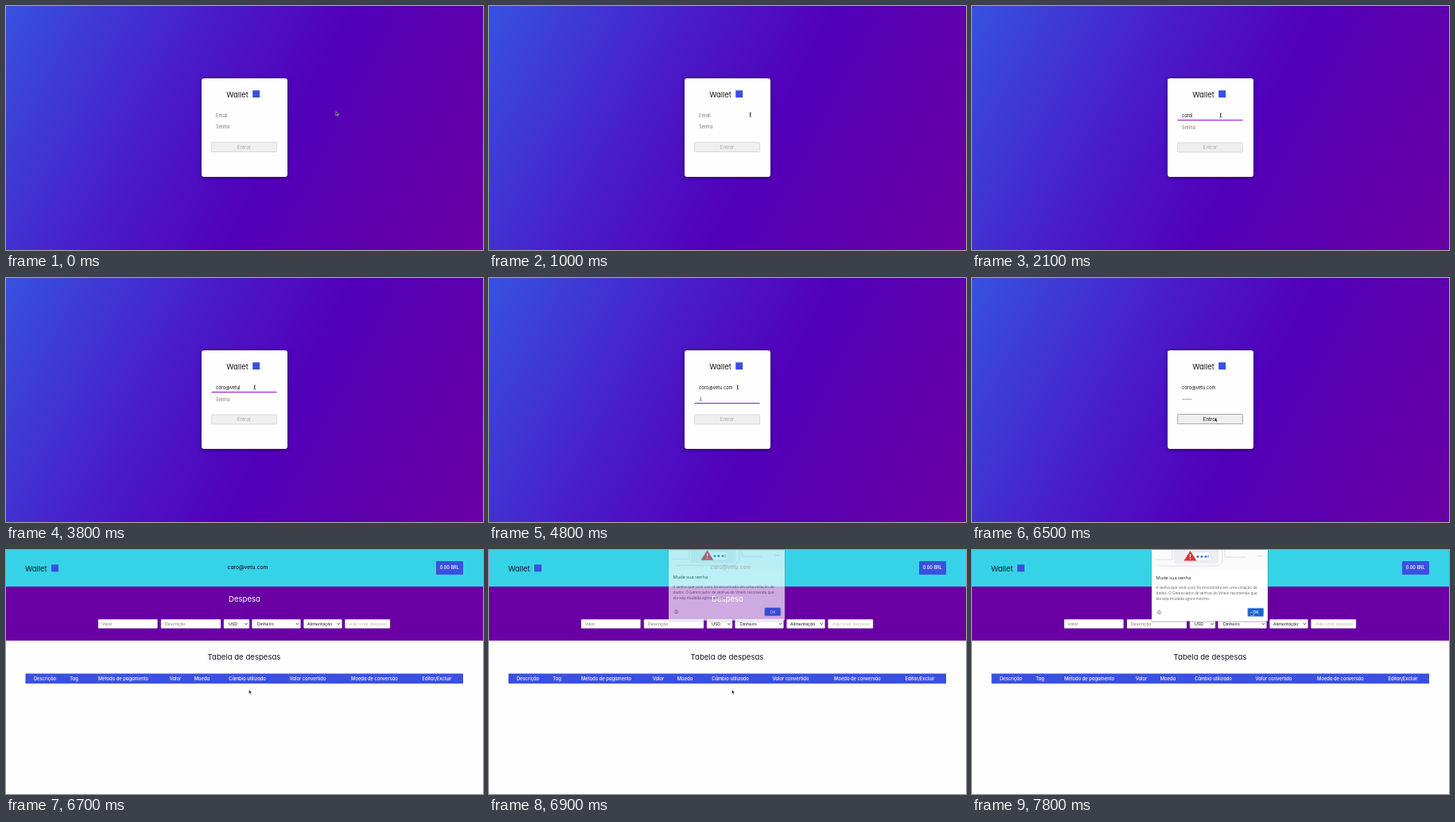
Animation of 600 by 307 pixels, one loop 8 s. Source, as an HTML page:

```html
<!DOCTYPE html>
<html lang="pt-BR">
<head>
<meta charset="utf-8">
<title>Wallet</title>
<style>
  html, body { margin: 0; height: 100%; overflow: hidden; }
  body { background: #fefefe; }
  svg { display: block; width: 100vw; height: 100vh; }
  text { font-family: Inter, Lato, sans-serif; font-feature-settings: "cv11"; white-space: pre; }
  .dots { font-family: "DejaVu Sans", sans-serif; }
  #popup text { font-family: "Open Sans", "Noto Sans", sans-serif; }
  .mid { text-anchor: middle; }
  .bg { width: 600px; height: 307px;
    background: linear-gradient(118deg, #3652df 0%, #4a1ac8 36%, #5200b9 58%, #6a00a3 100%); }
  .card { position: absolute; left: 246px; top: 91px; width: 107.5px; height: 123.5px;
    border-radius: 3px; background: #fefefe; box-shadow: 0 1px 5px #0008; }
</style>
</head>
<body>
<svg id="stage" viewBox="0 0 600 307"></svg>
<script>
const LOOP = 8000, STEP = 100;
const BLUE = '#3a50e0', PURPLE = '#6a00a3', INK = '#151520';
const EMAIL = 'caro@vetu.com';
const emailKeys = [1600, 1700, 1800, 2100, 2900, 3200, 3300, 3500, 3700, 4000, 4200, 4400, 4500];
const passKeys = [4800, 4900, 5100, 5300, 5500, 5700];

const text = (x, y, size, str, fill = INK, extra = '') =>
  `<text x="${x}" y="${y}" font-size="${size}" fill="${fill}" ${extra}>${str}</text>`;
const mid = (x, y, size, str, fill, weight = 400) =>
  text(x, y, size, str, fill, `class="mid" font-weight="${weight}"`);
const rect = (x, y, w, h, fill, extra = '') =>
  `<rect x="${x}" y="${y}" width="${w}" height="${h}" fill="${fill}" ${extra}/>`;
const brand = (x, y) => text(x, y, 9.4, 'Wallet') + rect(x + 33, y - 8.5, 9, 9, BLUE);

const login = `
  <foreignObject width="600" height="307"><div class="bg"></div></foreignObject>
  <foreignObject width="600" height="307"><div style="position:relative"><div class="card"></div></div></foreignObject>
  ${brand(277.2, 114.7)}
  ${text(264, 139.6, 5.7, '', INK, 'id="email"')}
  <g id="lower">
    ${text(264, 154, 5.7, '', INK, 'id="pass"')}
    ${rect(258.5, 171.5, 82, 12, '#efefef', 'id="enter" rx="1" stroke-width=".7"')}
    ${text(299.5, 179.6, 6.1, 'Entrar', INK, 'id="enterText" class="mid"')}
  </g>
  ${rect(258.5, 0, 82, 1.2, '#9a2bcf', 'id="underline"')}
  ${rect(0, 0, .5, 5.6, '#111', 'id="caret"')}`;

const fields = [
  // x, width, text x, label, colour, chevron x
  [116, 74.5, 120.5, 'Valor', '#777'],
  [195, 75, 200, 'Descrição', '#777'],
  [274, 32, 280, 'USD', INK, 302],
  [309.5, 61, 316, 'Dinheiro', INK, 366.5],
  [374.5, 48, 379, 'Alimentação', INK, 418.3],
  [426.5, 56.5, 432, 'Adicionar despesa', '#bbb']
].map(([x, w, tx, label, fill, chev]) =>
  rect(x, 87.3, w, 11.2, '#fff', 'rx="1" stroke="#bbb" stroke-width=".4"') + text(tx, 94.8, 5.3, label, fill) +
  (chev ? `<path d="M${chev - 1.5} 92.2l1.5 1.6 1.5-1.6" fill="none" stroke="#111" stroke-width=".8"/>` : '')).join('');

const columns = [[49, 'Descrição'], [85.5, 'Tag'], [147.5, 'Método de pagamento'], [213, 'Valor'],
  [246.5, 'Moeda'], [303.5, 'Câmbio utilizado'], [379.5, 'Valor convertido'],
  [463.5, 'Moeda de conversão'], [542, 'Editar/Excluir']
].map(([x, label]) => mid(x, 163.6, 5.8, label, '#fff', 500)).join('');

const home = `
  ${rect(0, 0, 600, 307, '#fefefe')}
  ${rect(0, 0, 600, 46, '#36d3e8')}
  ${brand(24, 26.8)}
  ${mid(304, 24.4, 6.7, EMAIL, INK, 500)}
  ${rect(541, 14, 34, 17, BLUE, 'rx="1"')}
  ${mid(557.8, 24.3, 5.6, '0.00 BRL', '#fff', 500)}
  ${rect(0, 46, 600, 68, PURPLE)}
  ${mid(300, 64.8, 9.6, 'Despesa', '#fff')}
  ${fields}
  ${mid(299.5, 137.7, 9.6, 'Tabela de despesas')}
  ${rect(24.5, 155.5, 550.5, 12.5, BLUE)}
  ${columns}`;

const popup = `
  ${rect(225.5, -4, 147.5, 95, '#0003', 'rx="1.5"')}
  ${rect(226, -4, 146, 93.5, '#fff', 'rx="1"')}
  ${rect(226, 0, 146, 24, '#fafafb')}
  <path d="M230 12h22V0M235 20h74l6-5V0M318 0v9h26" fill="none" stroke="#dfe1e5" stroke-width="1"/>
  ${rect(254, 0, 56, 17, '#eceef1', 'rx="2"')}
  ${rect(278, 3, 22, 10.5, '#fff', 'rx="2" stroke="#d5dae2" stroke-width=".6"')}
  ${[284, 289, 294].map(x => `<circle cx="${x}" cy="8.2" r="1.5" fill="#3478e0"/>`).join('')}
  ${rect(296.7, 6.2, .8, 4, '#3478e0')}
  <path d="M274.5 1l8 12.5h-16z" fill="#d9343a"/>
  ${rect(274, 5, 1.1, 4.2, '#fff')}${rect(274, 10.4, 1.1, 1.2, '#fff')}
  ${[360.5, 362.5, 364.5].map(x => `<circle cx="${x}" cy="7.3" r=".6" fill="#bbb"/>`).join('')}
  ${text(231.5, 36.8, 5.7, 'Mude sua senha', '#202124', 'font-weight="500"')}
  ${['A senha que você usou foi encontrada em uma violação de',
     'dados. O Gerenciador de senhas do Vinelo recomenda que',
     'ela seja mudada agora mesmo.'].map((s, i) => text(231.5, 48.8 + i * 7.1, 4.65, s, '#5f6368')).join('')}
  <circle cx="235.6" cy="78.5" r="2.1" fill="none" stroke="#5f6368" stroke-width=".6"/>
  ${rect(235.3, 77.2, .6, .6, '#5f6368')}${rect(235.3, 78.2, .6, 1.6, '#5f6368')}
  ${rect(346.3, 72.8, 21, 11.2, '#8db8f3', 'rx="1.5"')}
  ${rect(347.2, 73.6, 19.2, 9.6, '#1a73e8', 'id="ok" rx="1"')}
  ${mid(356.8, 80.3, 5, 'OK', '#fff', 600)}`;

const stage = document.getElementById('stage');
stage.innerHTML = `<g id="login">${login}</g><g id="home">${home}</g><g id="popup">${popup}</g>
  <path id="arrow" d="M0 0V5.2L1.2 4.1 2 5.9 2.9 5.5 2.1 3.8H3.7Z" fill="#111" stroke="#fff" stroke-width=".5"/>
  <path id="beam" d="M-1.2-2.6Q0-2.6 0-1.8V1.8Q0 2.6-1.2 2.6M1.2-2.6Q0-2.6 0-1.8V1.8Q0 2.6 1.2 2.6"
    fill="none" stroke="#222" stroke-width=".7"/>`;

const el = {};
stage.querySelectorAll('[id]').forEach(n => el[n.id] = n);
const set = (id, attrs) => Object.entries(attrs).forEach(([k, v]) => el[id].setAttribute(k, v));
const show = (id, on) => el[id].style.display = on ? '' : 'none';
const count = (keys, t) => keys.filter(k => k <= t).length;

// start, end, from, to
const moves = [
  [400, 1200, [415, 132.5], [312.7, 137.5]],
  [5900, 6500, [312.7, 137.5], [305.5, 175.8]],
  [7100, 7800, [305.5, 175.8], [351, 78]]
];
function pointer(t) {
  const [a, b, from, to] = moves.findLast(m => t >= m[0]) || moves[0];
  const p = Math.min(1, Math.max(0, (t - a) / (b - a)));
  const e = p * p * (3 - 2 * p);
  return from.map((v, i) => v + (to[i] - v) * e);
}

function drawLogin(t) {
  const nEmail = count(emailKeys, t), nPass = count(passKeys, t);
  const focus = t < 1200 || t >= 6500 ? '' : t < 4600 ? 'email' : 'pass';
  const ready = nPass === passKeys.length;
  const shift = focus ? .5 : 0;

  el.email.textContent = EMAIL.slice(0, nEmail) || 'Email';
  set('email', { fill: nEmail ? INK : '#777' });
  el.pass.textContent = '•'.repeat(nPass) || 'Senha';
  set('pass', { fill: nPass ? INK : '#777', 'font-size': nPass ? 3.5 : 5.7, class: nPass ? 'dots' : '' });
  set('lower', { transform: `translate(0 ${shift})` });
  set('enter', { stroke: ready ? '#858585' : '#cfcfcf' });
  set('enterText', { fill: ready ? '#111' : '#aaa' });

  const blinkOff = t >= 2700 && t < 2900;
  show('underline', focus);
  show('caret', focus && !blinkOff);
  if (!focus) return;
  const typed = focus === 'email' ? nEmail : nPass;
  const width = typed ? el[focus].getComputedTextLength() : 0;
  set('underline', { y: focus === 'email' ? 143 : 157 });
  set('caret', { x: 264.2 + width, y: focus === 'email' ? 134.8 : 149.5 });
}

function draw(t) {
  const onLogin = t < 6700;
  show('login', onLogin);
  show('home', !onLogin);
  if (onLogin) drawLogin(t);

  const open = Math.min(1, Math.max(0, (t - 6700) / 300));
  show('popup', open);
  set('popup', { opacity: open, transform: `translate(0 ${-6 * (1 - open) ** 2})` });
  set('ok', { fill: t >= 7700 ? '#1765cc' : '#1a73e8' });

  const [x, y] = pointer(t);
  const overField = onLogin && x > 258 && x < 341 && y > 131 && y < 158;
  show('beam', overField);
  show('arrow', !overField);
  set(overField ? 'beam' : 'arrow', { transform: `translate(${x} ${y})` });
}

function tick() {
  const t = performance.now() % LOOP;
  draw(Math.floor(t / STEP) * STEP);
  requestAnimationFrame(tick);
}
tick();
</script>
</body>
</html>
```
